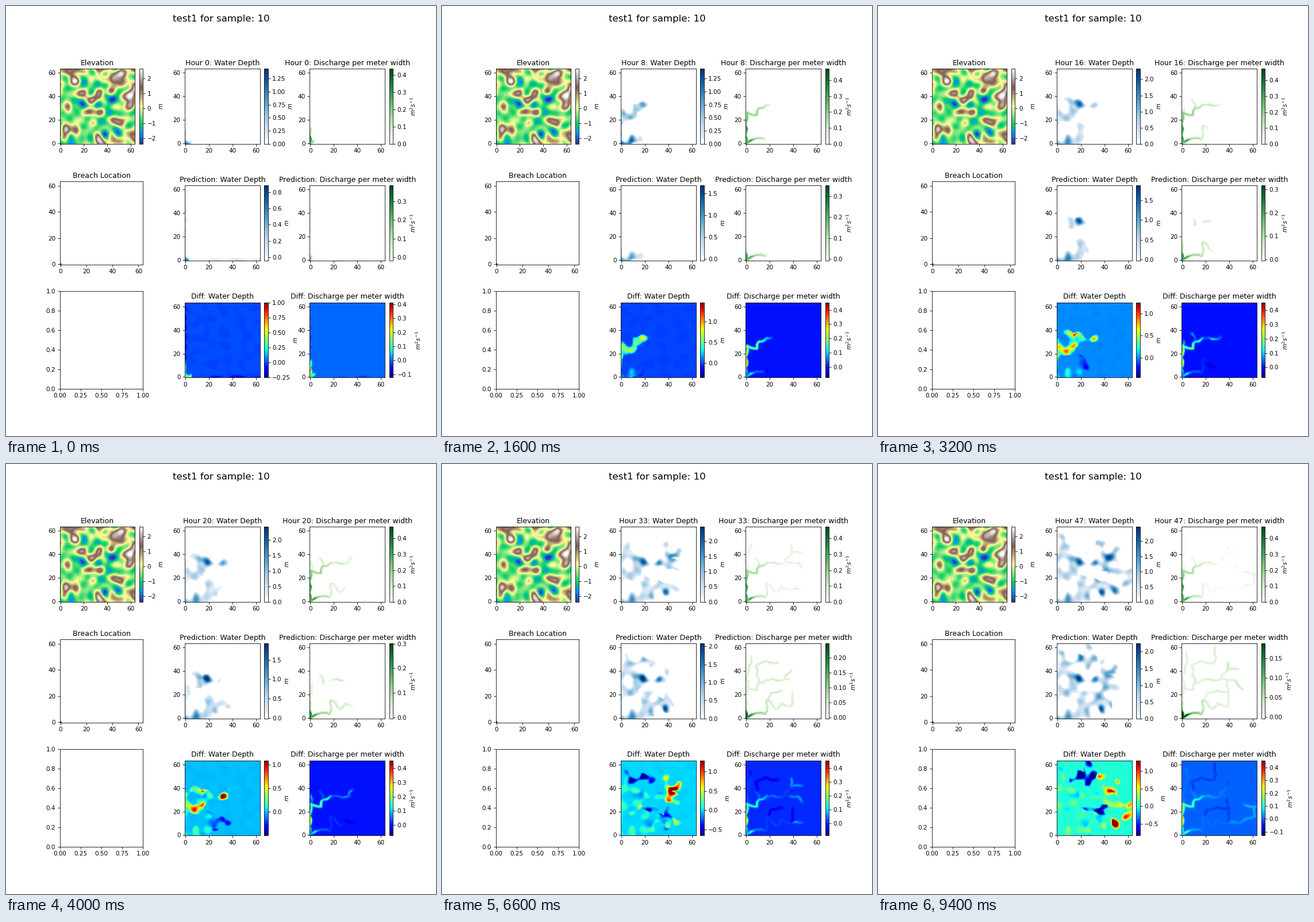
A matplotlib script for the animation above (9.6 s loop, 748 by 748 pixels).

```python
import numpy as np
import matplotlib.pyplot as plt
from matplotlib.animation import FuncAnimation
from matplotlib.colors import ListedColormap
from mpl_toolkits.axes_grid1 import make_axes_locatable

INCHES, DPI = 10, 74.8
HOURS, STEP_MS = 48, 200
N = 64
NEVER = 999

plt.rcParams["font.family"] = "DejaVu Sans"
hours = np.arange(HOURS)
X, Y = np.meshgrid(np.arange(N), np.arange(N))

# Key hollows where several routes meet
BREACH, WEST, BANK = (0, 0), (0, 9), (1, 26)
POND, BEND, LAKE, MERE = (18, 15), (11, 30), (18.5, 32.5), (31.5, 32.5)
BASIN, EAST, NORTH, KNOLL = (38.5, 10), (50, 11), (38, 41), (9, 37)

# Each route: hollows in order, hours of its first and last arrival
# in the simulation and in the prediction
ROUTES = [
    ([BREACH, WEST], (-8, -3), (-3, 5)),
    ([WEST, (0, 17), BANK, (9, 24), BEND, LAKE], (-1, 6), (12, 28)),
    ([BREACH, (9, 5), (17, 3), POND], (-2, 13), (0, 11)),
    ([LAKE, MERE, NORTH, (47, 42)], (6, 27), (10, 40)),
    ([POND, (26, 8), (30, 12), BASIN], (13, 23), (12, 20)),
    ([BASIN, EAST, (61, 16), (62, 24), (51, 25)], (28, 47), None),
    ([MERE, (43, 33), (51, 25)], (18, 35), (28, 46)),
    ([BANK, (1, 38), (4, 47), (4, 56)], (12, 37), (18, 34)),
    ([BEND, KNOLL], (9, 13), (12, 17)),
    ([KNOLL, (9, 46), (18, 48), (28, 46), (28, 60)], None, (20, 38)),
    ([NORTH, (39, 48)], (26, 30), (40, 46)),
    ([POND, (22, 22), (39, 23)], None, (24, 36)),
    ([BASIN, (40, 17), (39, 23), (38, 32)], None, (28, 36)),
]
DEEP = {LAKE: -2.3, MERE: -1.9, BASIN: -2.1, EAST: -1.6, BREACH: -1.4, (9, 5): -1.5}
HILLS = [(10, 57), (10, 51), (33, 62), (44, 53), (54, 58), (52, 54), (61, 46),
         (24, 37), (29, 39), (34, 44), (26, 27), (6, 31), (46, 18), (52, 18),
         (13, 11), (59, 30), (62, 8)]
SUMMITS = [(4, 11), (32, 4), (61, 40)]
SPILL = -0.1  # water collects below this height


def ripple(seed, count=80):
    """Smooth random field with unit spread."""
    rng = np.random.default_rng(seed)
    field = np.zeros((N, N))
    for _ in range(count):
        k, a, p = rng.uniform(0.3, 0.7), rng.uniform(0, np.pi), rng.uniform(0, 2 * np.pi)
        field += np.cos(k * (X * np.cos(a) + Y * np.sin(a)) + p)
    return field / field.std()


def key_heights():
    heights = {}
    for points, _, _ in ROUTES:
        for p in points:
            heights[p] = DEEP.get(p, -1.0)
        for (x0, y0), (x1, y1) in zip(points, points[1:]):
            heights[((x0 + x1) / 2, (y0 + y1) / 2)] = -0.45
    heights.update({p: 1.6 for p in HILLS})
    heights.update({p: 2.5 for p in SUMMITS})
    return np.array(list(heights)), np.array(list(heights.values()))


def make_terrain():
    """Random relief bent so that it passes through the key heights."""
    points, heights = key_heights()
    base = 0.15 + 0.7 * ripple(3)

    def kernel(dx, dy):
        return np.exp(-(dx ** 2 + dy ** 2) / 4.5 ** 2)

    px, py = points.T
    gap = heights - base[py.astype(int), px.astype(int)]
    matrix = kernel(px[:, None] - px, py[:, None] - py) + 0.08 * np.eye(len(px))
    weights = np.linalg.solve(matrix, gap)
    bend = kernel(X[..., None] - px, Y[..., None] - py) @ weights
    return np.clip(base + bend, -2.38, 2.65)


def rise(age, tau):
    return 1 - np.exp(-np.maximum(age, 0) / tau)


def walk(points, span):
    """Points along a slightly winding route with their arrival hours."""
    px, py = np.array(points, float).T
    dist = np.append(0, np.cumsum(np.hypot(np.diff(px), np.diff(py))))
    s = np.linspace(0, dist[-1], int(dist[-1] / 0.8) + 2)
    x = np.interp(s, dist, px) + 0.6 * np.sin(0.6 * s)
    y = np.interp(s, dist, py) + 0.6 * np.sin(0.5 * s)
    return zip(x, y, np.linspace(*span, len(s)))


def flood(side, sheet, share):
    """Water depth and discharge for every hour."""
    arrival = np.full((N, N), float(NEVER))
    flow = np.zeros((HOURS, N, N))
    for route in ROUTES:
        if route[side] is None:
            continue
        for x, y, start in walk(route[0], route[side]):
            dist = np.hypot(X - x, Y - y)
            arrival = np.minimum(arrival, start + 0.06 * dist ** 3)
            late = max(start, 0)
            age = np.maximum(hours - start, 0)
            rate = share * (0.1 + 0.32 * np.exp(-late / 6))
            rate = rate * rise(age, 1.2) * np.exp(-age * late / 600)
            col, row = np.clip([int(round(x)), int(round(y))], 0, N - 1)
            rate /= 1 + 0.3 * sheet[row, col]
            flow = np.maximum(flow, rate[:, None, None] * np.exp(-(dist / 0.95) ** 2))
    depth = sheet * rise(hours[:, None, None] - arrival, 2 + sheet)
    return depth, flow


terrain = make_terrain()
sheet = np.maximum(0, SPILL - terrain)
wave = ripple(5)
real_depth, real_flow = flood(1, sheet, 1)
model_depth, model_flow = flood(2, sheet * (0.92 + 0.12 * wave), 0.75)

# Short-lived residue along the borders and faint unevenness in the prediction
fading = np.exp(-hours / 2)[:, None, None]
side_edge = np.exp(-X ** 2 - ((Y - 35) / 24) ** 2) * (0.55 + 0.45 * np.cos(Y * 0.75))
base_edge = np.exp(-Y ** 2 - ((X - 42) / 20) ** 2) * (0.5 + 0.5 * np.cos((X - 25) * 0.32))
model_depth += 0.011 * np.clip(wave, 0, 1) + 0.17 * fading * (side_edge + base_edge)
model_flow += 0.03 * fading * (side_edge + base_edge)

# Colour limits over time
start = np.exp(-hours / 3)
swing = np.cos(2 * np.pi * (hours - 8) / 32)
zero = 0 * hours
LIMITS = {
    "real depth": (zero, 1.44 + 1.04 * rise(hours - 8.3, 4)),
    "real flow": (zero, 0.474 - 0.039 * start),
    "model depth": (-0.045 * np.clip(1 - hours / 40, 0, 1),
                    1.7 + 0.0115 * hours - 0.82 * np.exp(-hours / 4)),
    "model flow": (-0.004 - 0.014 * np.exp(-hours / 8), 0.385 - 0.0042 * hours),
    "diff depth": (-0.25 - 0.0123 * hours, 1.25 + 0.23 * swing - 0.25 * start),
    "diff flow": (-0.07 - 0.054 * start - 0.06 * (hours / 47) ** 3, 0.455 - 0.04 * start),
}


def white_based(name):
    colors = plt.get_cmap(name)(np.linspace(0, 1, 256))
    colors[:16] = 1
    return ListedColormap(colors)


def panel(ax, data, cmap, low, high, unit, title):
    image = ax.imshow(data, origin="lower", cmap=cmap, vmin=low, vmax=high)
    ax.set_title(title)
    cax = make_axes_locatable(ax).append_axes("right", size="5%", pad=0.1)
    fig.colorbar(image, cax=cax).set_label(unit)
    return image


DEPTH_UNIT, FLOW_UNIT = "$m$", "$m^2s^{-1}$"
DEPTH_NAME, FLOW_NAME = "Water Depth", "Discharge per meter width"

fig, axes = plt.subplots(3, 3, figsize=(INCHES, INCHES), dpi=DPI)
fig.subplots_adjust(left=0.125, right=0.9, bottom=0.11, top=0.88, wspace=0.5, hspace=0.2)
fig.suptitle("test1 for sample: 10", fontsize=16)

panel(axes[0, 0], terrain, "terrain", -2.38, 2.65, DEPTH_UNIT, "Elevation")
breach = np.zeros((N, N))
breach[BREACH] = 1
axes[1, 0].imshow(breach, origin="lower", cmap="binary")
axes[1, 0].set_title("Breach Location")

panels = []
columns = (("depth", real_depth, model_depth, "Blues", DEPTH_UNIT, DEPTH_NAME),
           ("flow", real_flow, model_flow, "Greens", FLOW_UNIT, FLOW_NAME))
for col, (kind, real, model, tint, unit, name) in enumerate(columns, 1):
    cmap = white_based(tint)
    rows = (("real", real, cmap, "Hour 0"), ("model", model, cmap, "Prediction"),
            ("diff", real - model, "jet", "Diff"))
    for row, (source, data, colors, label) in enumerate(rows):
        low, high = LIMITS[f"{source} {kind}"]
        image = panel(axes[row, col], data[0], colors, low[0], high[0], unit,
                      f"{label}: {name}")
        panels.append((image, data, low, high))


def update(hour):
    for image, data, low, high in panels:
        image.set_data(data[hour])
        image.set_clim(low[hour], high[hour])
    axes[0, 1].set_title(f"Hour {hour}: {DEPTH_NAME}")
    axes[0, 2].set_title(f"Hour {hour}: {FLOW_NAME}")
    return [item[0] for item in panels]


anim = FuncAnimation(fig, update, frames=HOURS, interval=STEP_MS, repeat=True, blit=False)
plt.show()
```
